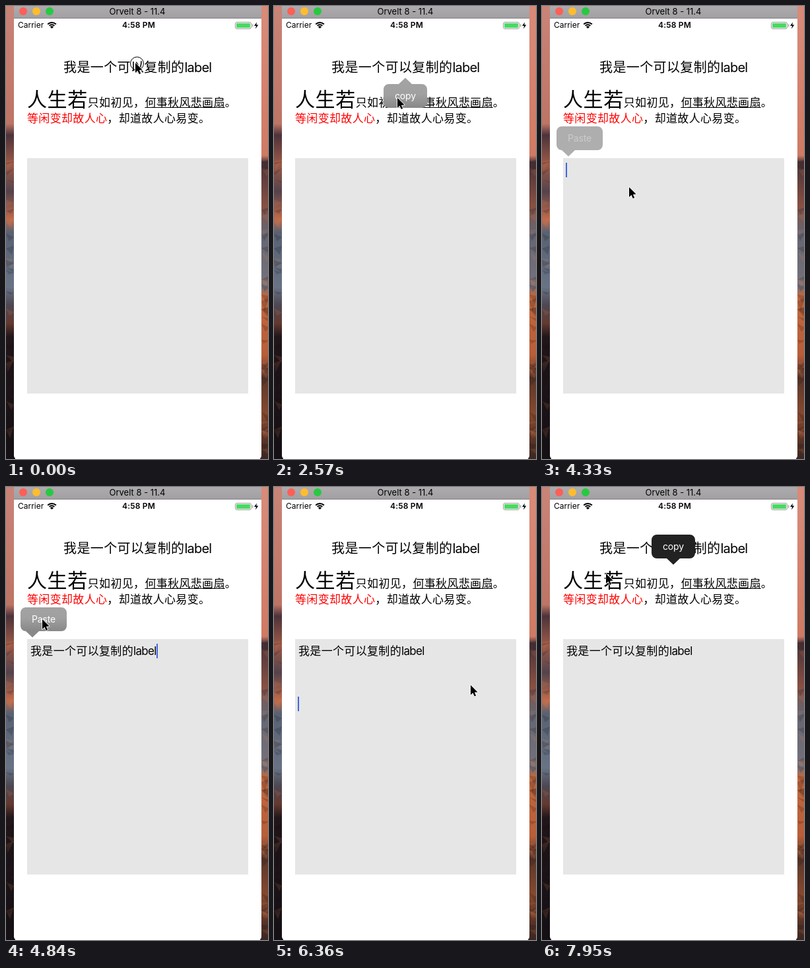
Recreate the animation shown at these times as an HTML page with a canvas. Size 397x685 px, loop 8000 ms.

```html
<!DOCTYPE html>
<html lang="zh">
<head>
<meta charset="utf-8">
<style>
html, body { margin: 0; width: 100%; height: 100%; overflow: hidden; background: #fff; }
canvas { display: block; }
</style>
</head>
<body>
<canvas id="stage" width="397" height="685"></canvas>
<script>
const LOOP = 8000;
const ctx = document.getElementById('stage').getContext('2d');
const LATIN = 'Inter, Roboto, sans-serif';
const HAN = '"Noto Sans CJK SC", "Noto Sans CJK", "Noto Sans CJK JP", sans-serif';

// Pointer tip: time, x, y
const path = [
  [0, 196, 86], [60, 196, 86], [200, 184, 86], [1900, 184, 86], [2400, 187, 139],
  [2750, 187, 139], [3400, 134, 309], [3570, 134, 309], [3950, 132, 274],
  [4390, 132, 274], [4690, 55, 200], [4850, 55, 200], [5190, 275, 292],
  [5310, 303, 304], [6300, 303, 304], [6930, 110, 134], [7040, 97, 131], [LOOP, 97, 131]
];
const presses = [[0, 60], [1090, 1900], [2460, 2560], [3430, 3520], [4010, 4150], [4720, 4800], [7220, 7830]];

const clamp = v => Math.max(0, Math.min(1, v));
const ramp = (t, from, to) => clamp((t - from) / (to - from));
const within = (t, [from, to]) => t >= from && t < to;

function text(str, x, y, size, { color = '#000', font = LATIN, weight = 400, spacing = 0, align = 'left' } = {}) {
  ctx.font = `${weight} ${size}px ${font}`;
  ctx.letterSpacing = spacing + 'px';
  ctx.textAlign = align;
  ctx.fillStyle = color;
  ctx.fillText(str, x, y);
  return x + ctx.measureText(str).width;
}

const han = (str, x, y, size, color) =>
  text(str, x, y, size, { color, font: HAN, spacing: size * 0.0195 });

function copyLabel(x, y, size) {
  const end = han('我是一个可以复制的', x, y, size);
  text('label', end, y, size, { spacing: -size * 0.04 });
}

function rect(x, y, w, h, color) {
  ctx.fillStyle = color;
  ctx.fillRect(x, y, w, h);
}

function round(x, y, w, h, r) {
  ctx.beginPath();
  ctx.roundRect(x, y, w, h, r);
}

function poly(points) {
  ctx.beginPath();
  points.forEach(([x, y]) => ctx.lineTo(x, y));
  ctx.closePath();
}

function disc(x, y, r, color) {
  ctx.beginPath();
  ctx.arc(x, y, r, 0, 7);
  ctx.fillStyle = color;
  ctx.fill();
}

function gradient(y0, y1, stops) {
  const g = ctx.createLinearGradient(0, y0, 0, y1);
  stops.forEach(([at, color]) => g.addColorStop(at, color));
  return g;
}

// Soft mountain tones beside the window
function wallpaper() {
  rect(0, 0, 14, 685, gradient(0, 685, [
    [0, '#c98478'], [.26, '#bd7565'], [.285, '#4c333a'], [.35, '#9c5a48'], [.41, '#54434c'],
    [.47, '#c06a4a'], [.5, '#586273'], [.62, '#687386'], [.66, '#4d4853'], [.7, '#643a30'],
    [.73, '#21161a'], [1, '#141014']]));
  rect(385, 0, 12, 685, gradient(0, 685, [
    [0, '#d98b7a'], [.33, '#cf7a64'], [.345, '#4a3339'], [.44, '#875043'], [.5, '#646672'],
    [.62, '#75717b'], [.64, '#c0683e'], [.77, '#b85e39'], [.82, '#5a372b'], [.9, '#85492f'],
    [1, '#3a2622']]));
  let seed = 7;
  const rnd = () => (seed = seed * 16807 % 2147483647) / 2147483647;
  for (let i = 0; i < 70; i++) {
    const x = i % 2 ? 387 : 0, y = 235 + rnd() * 440, h = 3 + rnd() * 12;
    poly([[x, y], [x + 12, y + rnd() * 14 - 7], [x + 12 * rnd(), y + h]]);
    ctx.fillStyle = rnd() < .6 ? '#15101530' : '#d8805028';
    ctx.fill();
  }
}

function statusBar() {
  text('Carrier', 18, 33, 12);
  text('4:58 PM', 201, 33, 12, { weight: 600, spacing: .2, align: 'center' });
  ctx.strokeStyle = '#000';
  ctx.lineWidth = 2;
  for (const r of [5.2, 8.6]) {
    ctx.beginPath();
    ctx.arc(69.5, 33.5, r, -Math.PI * .76, -Math.PI * .24);
    ctx.stroke();
  }
  ctx.beginPath();
  ctx.moveTo(69.5, 34);
  ctx.arc(69.5, 34, 3.6, -Math.PI * .76, -Math.PI * .24);
  ctx.fillStyle = '#000';
  ctx.fill();
  ctx.lineWidth = 1;
  ctx.strokeStyle = '#999';
  round(347.5, 24.5, 24, 10, 2.5);
  ctx.stroke();
  round(349, 26, 21, 7, 1);
  ctx.fillStyle = '#4cd964';
  ctx.fill();
  rect(373, 27.5, 1.3, 4, '#999');
  poly([[380, 24.5], [376, 30], [379, 30], [378, 34.5], [382.3, 28.5], [379.3, 28.5]]);
  ctx.fillStyle = '#000';
  ctx.fill();
}

function simulator() {
  wallpaper();
  round(12, -6, 375, 691, [0, 0, 5, 5]);
  ctx.fillStyle = '#fff';
  ctx.fill();
  rect(12, 0, 375, 19, gradient(0, 19, [[0, '#adabad'], [1, '#a19fa2']]));
  rect(12, 18, 375, 1, '#848284');
  ['#ff5f57', '#ffbd2e', '#28c940'].forEach((c, i) => disc(26 + i * 20, 8, 6, c));
  text('Orvelt 8 - 11.4', 199, 13, 13, { align: 'center' });
  statusBar();

  copyLabel(87, 100, 20);
  let x = han('人生若', 32, 152, 30);
  x = han('只如初见，', x, 152, 17);
  const end = han('何事秋风悲画扇', x, 152, 17);
  rect(x, 153, end - x, 1, '#000');
  han('。', end, 152, 17);
  x = han('等闲变却故人心', 32, 176, 17, '#f00');
  han('，却道故人心易变。', x, 176, 17);
  rect(32, 230, 335, 356, '#e6e6e6');
}

// dir -1 puts the arrow on top, 1 below
function menu(str, x, y, w, tip, dir, alpha, pressed) {
  if (alpha <= 0) return;
  ctx.globalAlpha = alpha;
  const base = dir < 0 ? y : y + 36;
  const shape = new Path2D();
  shape.roundRect(x, y, w, 36, 8);
  const arrow = [[tip - 10, base], [tip, base + dir * 9.5], [tip + 10, base]];
  if (dir > 0) arrow.reverse();
  arrow.forEach(([px, py], i) => i ? shape.lineTo(px, py) : shape.moveTo(px, py));
  shape.closePath();
  ctx.fillStyle = pressed ? gradient(y - 9, y + 36, [[0, '#a4a4a4'], [.55, '#a0a0a0'], [1, '#888']]) : '#222';
  ctx.fill(shape);
  text(str, x + w / 2, y + 23, 14, { color: '#fff', spacing: -.15, align: 'center' });
  ctx.globalAlpha = 1;
}

function caret(t) {
  let x = 36, y = 237, alpha = t < 3460 ? 0 : 1;
  if (t >= 4800) {
    x = 228;
    alpha = 1 - ramp(t, 5640, 5770);
  }
  if (t >= 5950) {
    const line = [5950, 6030, 6120, 6300].filter(at => t >= at).length;
    x = 36;
    y += 20 * line;
    alpha = 1 - ramp(t, 6880, 7010) + ramp(t, 7360, 7450) - ramp(t, 7810, 7930);
  }
  ctx.globalAlpha = clamp(alpha);
  rect(x, y, 2, 22, '#4267e0');
  ctx.globalAlpha = 1;
}

function pointer(t) {
  if (t >= 5950 && t < 6300) return;
  const i = Math.max(1, path.findIndex(k => k[0] > t));
  const [t0, x0, y0] = path[i - 1], [t1, x1, y1] = path[i];
  const u = ramp(t, t0, t1), e = u * u * (3 - 2 * u);
  const x = x0 + (x1 - x0) * e, y = y0 + (y1 - y0) * e;
  if (presses.some(p => within(t, p))) {
    ctx.beginPath();
    ctx.arc(x + 2.5, y + 1, 10, 0, 7);
    ctx.strokeStyle = '#000';
    ctx.lineWidth = 1;
    ctx.stroke();
  }
  poly([[0, 0], [0, 15], [3.4, 11.8], [5.8, 17], [8.2, 16], [5.9, 10.9], [10.6, 10.6]]
    .map(([dx, dy]) => [x + dx, y + dy]));
  ctx.lineJoin = 'round';
  ctx.lineWidth = 1.6;
  ctx.strokeStyle = '#fff';
  ctx.stroke();
  ctx.fillStyle = '#000';
  ctx.fill();
}

function draw(t) {
  simulator();
  if (t >= 4800) copyLabel(37, 254, 17);
  caret(t);
  menu('copy', 166, 118, 66, 199, -1, ramp(t, 1585, 1885) - ramp(t, 2750, 3000), t >= 2460);
  menu('Paste', 22, 182, 70, 40, 1, ramp(t, 4240, 4490) - ramp(t, 4850, 5100), t >= 4740);
  menu('copy', 166, 72, 66, 199, 1, ramp(t, 7650, 7930));
  pointer(t);
}

const start = performance.now();
function frame() {
  draw((performance.now() - start) % LOOP);
  requestAnimationFrame(frame);
}
frame();
</script>
</body>
</html>
```
